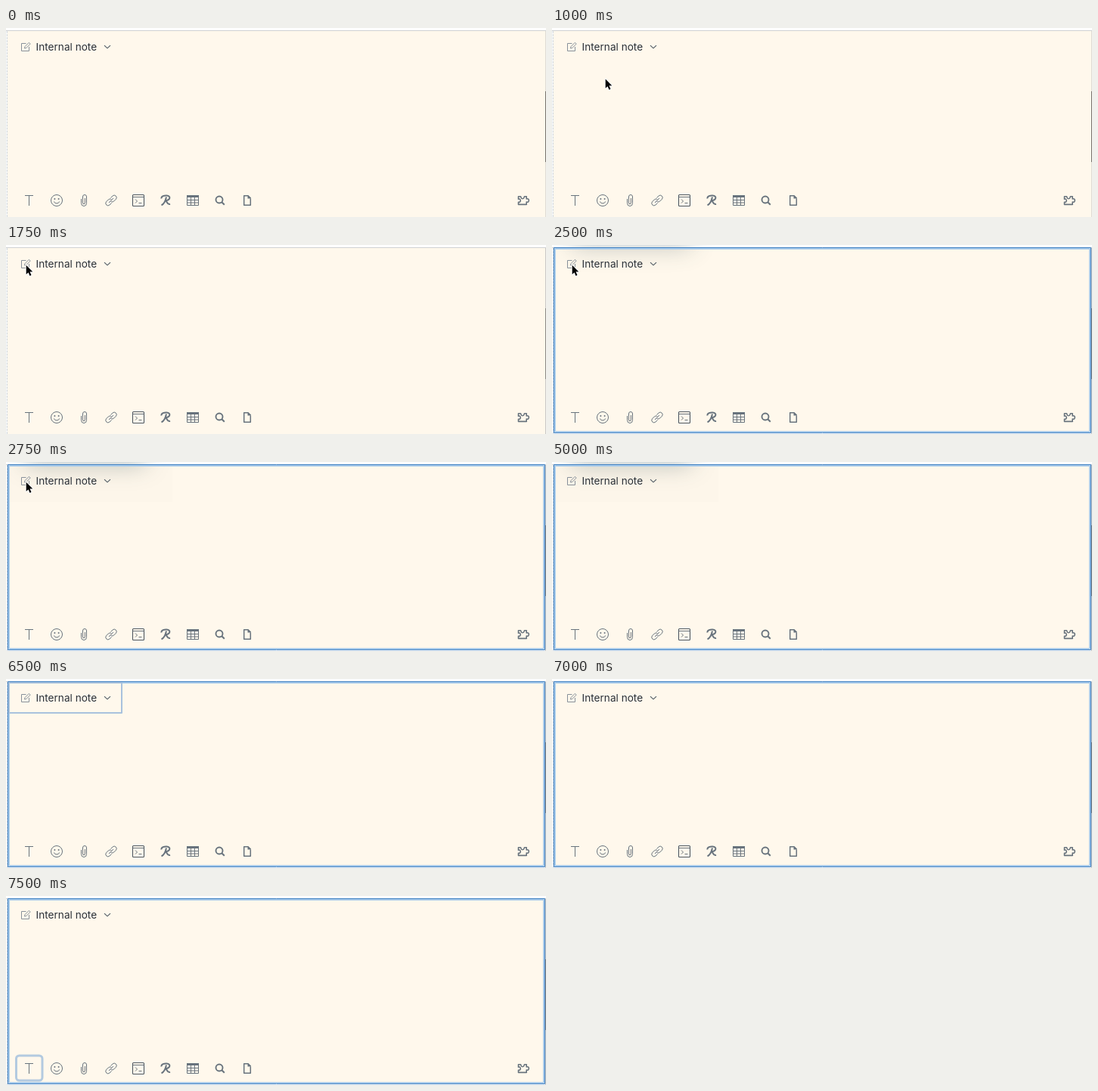
An HTML page with a canvas that plays this animation: 714x251 px, repeating every 8000 ms.

```html
<!DOCTYPE html>
<html lang="en">
<head>
<meta charset="utf-8">
<title>Internal note composer</title>
<style>
html, body { margin: 0; width: 100%; height: 100%; overflow: hidden; background: #fff; }
canvas { display: block; width: 714px; height: 251px; }
</style>
</head>
<body>
<canvas id="stage"></canvas>
<script>
const W = 714, H = 251, LOOP = 8000;
const CREAM = '#fff8ec', ICON = '#68737d';
const canvas = document.getElementById('stage');
const ctx = canvas.getContext('2d');
const dpr = window.devicePixelRatio || 1;
canvas.width = W * dpr;
canvas.height = H * dpr;

// The pointer jumps between these places: [time, x, y]; no place means hidden.
const POINTER = [
  [0], [1000, 69, 66], [1250, 38, 55], [1500, 25, 25],
  [4500, 56, 30], [4750, 30, 24], [5000]
];

function fill(color, x, y, w, h) {
  ctx.fillStyle = color;
  ctx.fillRect(x, y, w, h);
}

function line(d, width = 1, color = ICON) {
  ctx.strokeStyle = color;
  ctx.lineWidth = width;
  ctx.stroke(new Path2D(d));
}

function solid(d, color = ICON) {
  ctx.fillStyle = color;
  ctx.fill(new Path2D(d));
}

function frame(color, x, y, w, h, width) {
  ctx.strokeStyle = color;
  ctx.lineWidth = width;
  ctx.strokeRect(x + width / 2, y + width / 2, w - width, h - width);
}

function at(x, y, draw) {
  ctx.save();
  ctx.translate(x, y);
  draw();
  ctx.restore();
}

// Toolbar icons, each drawn around its own centre.
const ICONS = [
  [31, () => line('M-6 -6.5H5M-.5 -6.5V7')],
  [67, () => {
    line('M7.5 0A7.5 7.5 0 1 1 -7.5 0A7.5 7.5 0 1 1 7.5 0Z');
    solid('M-3.6 -2a1 1 0 1 1 2 0a1 1 0 1 1 -2 0M1.6 -2a1 1 0 1 1 2 0a1 1 0 1 1 -2 0');
    line('M-4 1.5Q0 6.5 4 1.5');
  }],
  [103, () => line('M-3.5 -2V3.5a3.5 4 0 0 0 7 0V-5a2.5 2.5 0 0 0 -5 0V3a1.4 1.6 0 0 0 2.9 0V-3')],
  [139, () => {
    line('M-.6 -3.4L2.2 -6.2a3.1 3.1 0 0 1 4.3 4.4L3.6 1.1a3.1 3.1 0 0 1 -3.8 .4');
    line('M.6 3.4L-2.2 6.2a3.1 3.1 0 0 1 -4.3 -4.4L-3.6 -1.1a3.1 3.1 0 0 1 3.8 -.4');
    line('M-3 3L3 -3');
  }],
  [175, () => {
    ctx.beginPath();
    ctx.roundRect(-7.5, -7.5, 15, 15, 1);
    ctx.stroke();
    line('M-7.5 -4.5H7.5M-4 -1.5L-1.5 1L-4 3.5M.5 3.5H4.5');
  }],
  [211, () => line('M-5.5 -2.5C-6 -6 -1.5 -6.6 1.5 -6.4C7.5 -6 6.5 .3 -1 .3M1 -4.5C0 0 -2 5 -5.5 6.3M0 .4C2.2 1 2 6.3 6 4.8', 2)],
  [247, () => {
    fill(ICON, -8, -7, 16, 3);
    line('M-7.5 -6.5H7.5V6.5H-7.5ZM-7.5 -.5H7.5M-7.5 3H7.5M-2.5 -4V6.5M2.5 -4V6.5');
  }],
  [283, () => {
    line('M3.5 -1A4.5 4.5 0 1 1 -5.5 -1A4.5 4.5 0 1 1 3.5 -1Z', 1.9);
    line('M2.3 2.3L5.8 5.8', 2);
  }],
  [319, () => {
    line('M1 -6.3H-4.3V6.3H4.3V-2.5', 1.5);
    solid('M.5 -7H1.4L5 -3.4V-2.4H.5Z');
  }],
  [684, () => line('M-6.5 -5.2H-3.6C-2.4 -4.6 -4 -2.2 -1 -2.2C2 -2.2 .4 -4.6 1.6 -5.2H4.2V-2C8.4 -3.4 8.4 3.4 4.2 2V5.4H-6.5V2.2C-2.8 3.4 -2.8 -3 -6.5 -1.8Z', 1.6)]
];

function drawPanel(t) {
  fill('#fff', 0, 0, W, H);
  fill(CREAM, 2, 4, 711, 247);
  fill('#cfd1d3', 0, 3, W, 1);
  fill('#f7f8f8', 0, 4, 1, 247);
  for (let y = 4; y < H; y += 4) fill('#d3d9df', 1, y, 1, 3);
  fill(t < 1750 ? '#dedbd5' : '#c9c8c6', 713, 4, 1, 247);
  fill(t < 1750 ? '#77736d' : '#8b8884', 713, 84, 1, 94);
}

// Soft edge of a menu that sits just above the stage.
function drawShadow(opened) {
  ctx.save();
  ctx.beginPath();
  ctx.rect(2, 0, 711, 60);
  ctx.clip();
  if (opened) fill('rgba(110,130,125,.014)', 5, 5, 215, 48);
  ctx.shadowColor = opened ? 'rgba(55,85,90,.36)' : 'rgba(55,85,90,.3)';
  ctx.shadowBlur = 32 * dpr;
  ctx.shadowOffsetY = 100 * dpr;
  fill('#000', 26, -140, 158, 43);
  ctx.restore();
}

function drawFocus() {
  fill('#fff', 2, 250, 711, 1);
  frame('#a9cbea', 3, 4, 709, 245, 2);
  frame('#3f80c2', 2, 3, 711, 247, 1);
}

function drawHeader() {
  at(20, 18, () => {
    line('M6.5 2.5H.5V12.5H10.5V7', 1, '#87909a');
    line('M4.5 9L5 6.7L10.4 1.3L12.2 3.1L6.8 8.5Z', 1, '#87909a');
  });
  ctx.font = '13.6px Inter, "Open Sans", sans-serif';
  ctx.fillStyle = '#2a3038';
  ctx.fillText('Internal note', 39.6, 30);
  line('M130 23.2L134 26.8L138 23.2', 1.1, '#4d5761');
}

function drawTextFocus() {
  ctx.beginPath();
  ctx.roundRect(13.5, 212, 34.5, 33, 4);
  ctx.strokeStyle = '#b3cae0';
  ctx.lineWidth = 3;
  ctx.stroke();
}

function drawPointer(t) {
  const [, x, y] = POINTER.filter(p => p[0] <= t).pop();
  if (x === undefined) return;
  at(x, y, () => {
    const arrow = 'M1.7 1.7V14L4.5 11.4L6.5 16L8.5 15.1L6.5 10.6H10.3Z';
    line(arrow, 2, '#fff');
    solid(arrow, '#000');
  });
}

function render(t) {
  ctx.setTransform(dpr, 0, 0, dpr, 0, 0);
  ctx.lineJoin = 'round';
  drawPanel(t);
  if (t >= 2500 && t < 6500) drawShadow(t >= 2750);
  if (t >= 2500) drawFocus();
  if (t >= 6500 && t < 7000) frame('#a9c2dd', 3, 4, 151, 42, 2);
  if (t >= 7500) drawTextFocus();
  drawHeader();
  for (const [x, draw] of ICONS) at(x, 229, draw);
  drawPointer(t);
}

const start = performance.now();
function tick() {
  render((performance.now() - start) % LOOP);
  requestAnimationFrame(tick);
}
tick();
</script>
</body>
</html>
```
